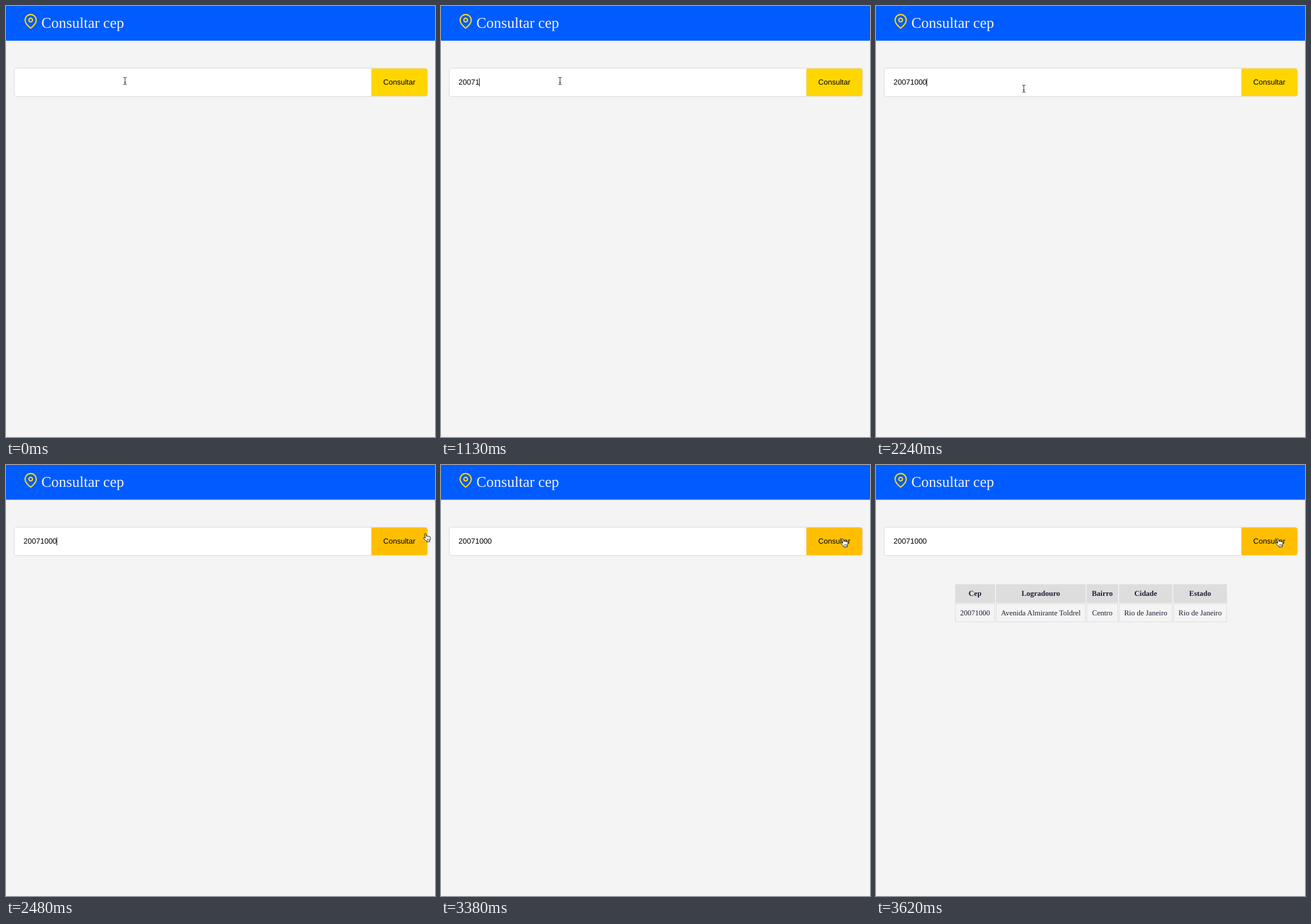
Write an HTML page that moves like this. It is 746x751 px and loops after 8000 ms.

```html
<!DOCTYPE html>
<html lang="pt-BR">
<head>
<meta charset="utf-8">
<title>Consultar cep</title>
<style>
  html, body { margin: 0; width: 100%; height: 100%; overflow: hidden; background: #f4f4f4; }
  svg { display: block; width: 746px; height: 751px; }
  text { text-rendering: geometricPrecision; white-space: pre; }
  .sans { font: 13px "Liberation Sans", Arial, sans-serif; }
  .serif { font: 13px "Liberation Serif", "Times New Roman", serif; }
  .title { font-size: 26px; fill: #f4f4f4; }
  .bar { filter: drop-shadow(.8px .8px 1px rgba(0, 0, 0, .25)); }
  .pin { fill: none; stroke: #ffd90f; stroke-width: 2; stroke-linecap: round; stroke-linejoin: round; }
  #table text { fill: #1d1d35; text-anchor: middle; }
  #table .head { font-weight: bold; }
</style>
</head>
<body>
<svg viewBox="0 0 746 751">
  <rect width="746" height="751" fill="#f4f4f4"/>
  <rect width="746" height="60.5" fill="#005cff"/>
  <g class="pin" transform="translate(30 13.8) scale(1.075)">
    <path d="M21 10c0 7-9 13-9 13s-9-6-9-13a9 9 0 0 1 18 0z"/>
    <circle cx="12" cy="10" r="3"/>
  </g>
  <text class="serif title" x="61.5" y="38">Consultar cep</text>

  <g class="bar">
    <path d="M635.5 109H19a4 4 0 0 0-4 4v40a4 4 0 0 0 4 4H635.5z" fill="#fff"/>
    <path id="button" d="M635.5 109H728.5a4 4 0 0 1 4 4v40a4 4 0 0 1-4 4H635.5z"/>
  </g>
  <text class="sans" id="digits" x="30.5" y="137"></text>
  <rect id="caret" y="126" width="1" height="14"/>
  <text class="sans" x="683.9" y="137" text-anchor="middle">Consultar</text>

  <g id="table" class="serif"></g>

  <g id="beam" fill="none">
    <path d="M-2.8-6.2Q0-6.2 0-4.8Q0-6.2 2.8-6.2M0-5V5.5M-2.8 6.4Q0 6.4 0 5Q0 6.4 2.8 6.4M-1.6 2.4H1.6" stroke="#fff" stroke-width="2.4"/>
    <path d="M-2.8-6.2Q0-6.2 0-4.8Q0-6.2 2.8-6.2M0-5V5.5M-2.8 6.4Q0 6.4 0 5Q0 6.4 2.8 6.4M-1.6 2.4H1.6" stroke="#222" stroke-width="1"/>
  </g>
  <g id="hand">
    <path transform="translate(-7 -7.7)" fill="#fff" stroke="#111" stroke-width="1" stroke-linejoin="round"
      d="M4.2 8.8L3 2.4q-.2-1.7 1-1.8q1-.1 1.4 1.4L6.2 5.6q.2-.9 1-.9q1 0 1.2 1.1q.3-.7 1.1-.6q1 .1 1.1 1.1q.3-.5 1-.5q1.3.1 1.4 1.8V10q0 1.6-1.2 3V15H6V13.8L1.4 9.6q-.9-1.1 0-1.8q.8-.6 1.6.2z"/>
    <path transform="translate(-7 -7.7)" stroke="#111" stroke-width=".7" d="M7.4 10V13M9.2 10V13M11 10V13"/>
  </g>
</svg>
<script>
const LOOP = 8000;
const TICK = 30;
const CEP = "20071000";
const DIGIT_WIDTH = 13 * 0.556;
const CARET_OFF = 2600;
const RESULT_AT = 3410;

// [ms, digits typed]
const typing = [[500, 1], [620, 2], [740, 3], [1130, 5], [1370, 6], [1670, 7], [1910, 8]];
// [ms, x, y]
const pointer = [
  [2240, 257, 144], [2300, 395, 156], [2360, 575, 150], [2420, 700, 134],
  [2480, 732, 126.5], [2570, 725, 129], [2690, 712, 133], [2810, 703.5, 135.5], [2990, 701.5, 135.5]
];
// [left, right, heading, value]
const columns = [
  [137.5, 207, "Cep", CEP],
  [208.5, 364.5, "Logradouro", "Avenida Almirante Toldrel"],
  [366, 421, "Bairro", "Centro"],
  [422.5, 515.5, "Cidade", "Rio de Janeiro"],
  [517, 610.3, "Estado", "Rio de Janeiro"]
];

const get = id => document.getElementById(id);
const [button, digits, caret, table, beam, hand] =
  ["button", "digits", "caret", "table", "beam", "hand"].map(get);
const show = (el, on) => { el.style.display = on ? "" : "none"; };

table.innerHTML = columns.map(([left, right, heading, value]) => {
  const width = right - left, mid = (left + right) / 2;
  return `<rect x="${left}" y="207.7" width="${width}" height="32.5" fill="#ddd"/>
    <rect x="${left + .5}" y="241.5" width="${width - 1}" height="31.7" fill="none" stroke="#ddd"/>
    <text class="head" x="${mid}" y="228">${heading}</text>
    <text x="${mid}" y="262">${value}</text>`;
}).join("");

function pointerAt(time) {
  if (time < pointer[0][0]) return [207, 130.5];
  const t = Math.floor(time / TICK + 1e-6) * TICK + 20;
  const next = pointer.findIndex(p => p[0] > t);
  if (next < 0) return pointer[pointer.length - 1].slice(1);
  if (next === 0) return pointer[0].slice(1);
  const [t0, x0, y0] = pointer[next - 1], [t1, x1, y1] = pointer[next];
  const k = (t - t0) / (t1 - t0);
  return [x0 + (x1 - x0) * k, y0 + (y1 - y0) * k];
}

function draw(time) {
  const count = typing.reduce((n, [at, typed]) => time >= at ? typed : n, 0);
  digits.textContent = CEP.slice(0, count);
  caret.setAttribute("x", 30 + count * DIGIT_WIDTH);
  show(caret, count > 0 && time < CARET_OFF);

  const [x, y] = pointerAt(time);
  const hover = x > 637;
  button.setAttribute("fill", hover ? "#ffbf00" : "#ffd600");
  show(beam, !hover);
  show(hand, hover);
  (hover ? hand : beam).setAttribute("transform", `translate(${x} ${y})`);
  show(table, time >= RESULT_AT);
}

let start;
function frame() {
  const now = performance.now();
  start ??= now;
  draw((now - start) % LOOP);
  requestAnimationFrame(frame);
}
frame();
</script>
</body>
</html>
```
